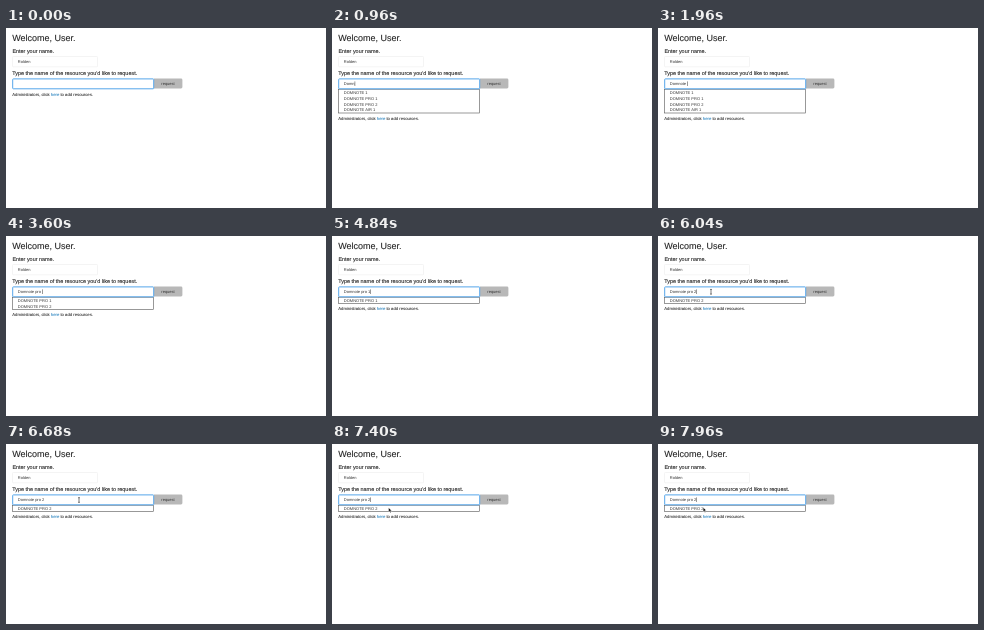
These frames come from a looping animation (320x180 px, 8 s). An HTML page:

```html
<!DOCTYPE html>
<html lang="en">
<head>
<meta charset="utf-8">
<title>Request a resource</title>
<style>
  html, body { margin: 0; width: 100%; height: 100%; overflow: hidden; background: #fff; }
  svg { display: block; width: 100%; height: 100%; }
  text {
    font: 4px "Liberation Sans", Arial, sans-serif;
    fill: #333;
    white-space: pre;
    text-rendering: geometricPrecision;
  }
  .title { font-size: 9px; fill: #222; stroke: #222; stroke-width: .1px; }
  .label { font-size: 5.45px; fill: #222; stroke: #222; stroke-width: .1px; }
  .note { font-size: 4.22px; fill: #222; stroke: #222; stroke-width: .05px; }
  .note tspan { fill: #1779ba; stroke: #1779ba; }
  .field { fill: #fff; stroke: #ececec; stroke-width: .6px; }
  .focus { stroke: #55a5ea; stroke-width: 1px; }
  .list { fill: #fff; stroke: #555; stroke-width: .6px; }
  .beam { fill: none; stroke: #222; stroke-width: .6px; }
  .arrow { fill: #000; stroke: #fff; stroke-width: .4px; }
</style>
</head>
<body>
<svg viewBox="0 0 320 180">
  <text class="title" x="6.2" y="12.8">Welcome, User.</text>
  <text class="label" x="6.4" y="24.9">Enter your name.</text>
  <rect class="field" x="6.5" y="28.5" width="85" height="10.3" rx=".8"/>
  <text x="11.8" y="35.4">Rolden</text>
  <text class="label" x="6.2" y="46.7">Type the name of the resource you'd like to request.</text>
  <path fill="#b8b8b8" d="M148 50.6h27q1.4 0 1.4 1.4v7q0 1.4-1.4 1.4h-27z"/>
  <text x="162" y="57" text-anchor="middle">request</text>
  <g id="menu">
    <rect class="list" id="frame" x="6.6" y="61.2" width="140.8"/>
    <g id="rows"></g>
  </g>
  <rect class="field focus" x="6.7" y="50.9" width="141" height="9.9" rx=".6"/>
  <text id="typed" x="11.8" y="57.2"></text>
  <rect id="caret" y="53.4" width=".5" height="4.6" fill="#333"/>
  <text class="note" id="note" x="6.3">Administrators, click <tspan>here</tspan> to add resources.</text>
  <path class="beam" id="beam" d="M-1-2.5Q0-2.5 0-1.8Q0-2.5 1-2.5M0-1.8V1.8M-1 2.5Q0 2.5 0 1.8Q0 2.5 1 2.5"/>
  <path class="arrow" id="arrow" d="M0 0V4.3L1 3.4L1.7 5L2.5 4.7L1.8 3.1H3.1Z"/>
</svg>
<script>
const LOOP = 8000, STEP = 40, ROW = 5.8;
const options = ["DOMNOTE 1", "DOMNOTE PRO 1", "DOMNOTE PRO 2", "DOMNOTE AIR 1"];
const phrase = "Domnote pro ";
const keyTimes = [80, 240, 480, 960, 1160, 1520, 1640, 1960, 2680, 2960, 3120, 3440];
// time, x, y of the pointer
const path = [
  [5960, 47, 70], [6040, 53, 55.8], [6200, 53, 55.8], [6400, 88, 56], [6680, 73, 56],
  [6920, 73, 56], [6960, 73.4, 56], [7080, 73.4, 56], [7440, 56, 64],
  [7680, 47, 68], [7880, 45, 63.6], [7920, 45, 63.6], [7960, 45.2, 63.4]
];
const $ = id => document.getElementById(id);
const show = (el, on) => el.setAttribute("visibility", on ? "visible" : "hidden");

function textAt(t) {
  const base = phrase.slice(0, keyTimes.filter(k => k <= t).length);
  if (t >= 5440) return base + "2";
  return t >= 3920 && t < 5040 ? base + "1" : base;
}

function pointerAt(t) {
  if (t < path[0][0]) return null;
  const i = path.findIndex(p => p[0] > t);
  if (i < 0) return path[path.length - 1].slice(1);
  const [a, b] = [path[i - 1], path[i]];
  const u = (t - a[0]) / (b[0] - a[0]);
  const e = u * u * (3 - 2 * u);
  return [a[1] + (b[1] - a[1]) * e, a[2] + (b[2] - a[2]) * e];
}

let shown = null;
function setText(value) {
  if (value === shown) return;
  shown = value;
  $("typed").textContent = value;
  $("caret").setAttribute("x", 12 + $("typed").getComputedTextLength());
  const hits = value ? options.filter(o => o.startsWith(value.toUpperCase())) : [];
  const n = hits.length;
  $("menu").style.display = n ? "" : "none";
  $("frame").setAttribute("height", n * ROW + .6);
  $("rows").innerHTML = hits.map((o, i) =>
    `<text x="11.8" y="${65.9 + i * ROW}">${o}</text>`).join("");
  $("note").setAttribute("y", n ? 68.6 + n * ROW : 67.8);
}

function draw(now) {
  const t = Math.floor(now % LOOP / STEP) * STEP;
  setText(textAt(t));
  show($("caret"), shown && (t < 6240 || t >= 7120));
  const p = pointerAt(t);
  const overField = p && p[1] < 61;
  show($("beam"), overField);
  show($("arrow"), p && !overField);
  if (p) for (const id of ["beam", "arrow"])
    $(id).setAttribute("transform", `translate(${p})`);
}

const start = performance.now();
function tick() {
  draw(performance.now() - start);
  requestAnimationFrame(tick);
}
tick();
</script>
</body>
</html>
```
